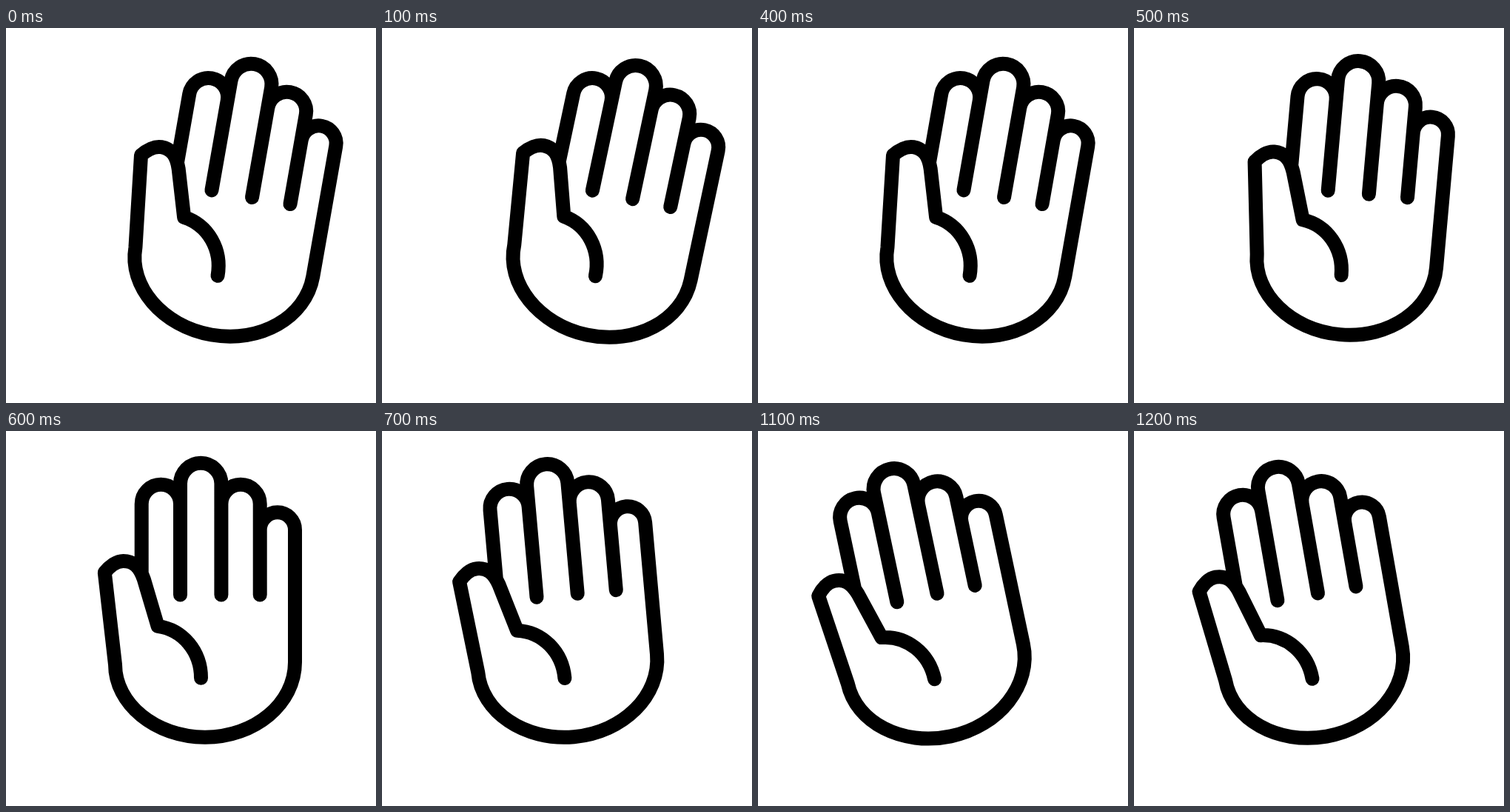
Write an HTML page with a canvas that moves like this. It is 500x506 px and loops after 1.3 s.

```html
<!DOCTYPE html>
<html lang="en">
<head>
<meta charset="utf-8">
<title>Waving hand</title>
<style>
  html, body { margin: 0; width: 100%; height: 100%; overflow: hidden; background: #fff; }
  canvas { display: block; }
</style>
</head>
<body>
<canvas id="stage" width="500" height="506"></canvas>
<script>
const ctx = document.getElementById('stage').getContext('2d');
const STEP = 100;
const COUNT = 13;
const PIVOT = { x: 263.5, y: 403, sway: 10.4 };

// Right half of the wave, in degrees; the left half mirrors it.
const TILT = [10, 12, 13, 12, 10, 5.1, 0];

// Hand coordinates: origin at the wrist pivot, y down.
const hand = new Path2D();

function finger(left, right, top, leftEnd, rightEnd) {
  hand.moveTo(left, leftEnd);
  hand.lineTo(left, top);
  hand.arc((left + right) / 2, top, (right - left) / 2, Math.PI, 0);
  hand.lineTo(right, rightEnd);
}

finger(-80.3, -28, -304.6, -213, -300);
finger(-28, 27.4, -332, -182, -182);
finger(27.4, 79.7, -304.5, -300, -182);
finger(79.7, 127, -269.5, -265, -91);

// Palm, thumb and the crease below it
hand.moveTo(127, -91);
hand.bezierCurveTo(127, -35, 72.6, 10.2, 5.5, 10.2);
hand.bezierCurveTo(-62, 10.2, -116, -35, -116, -88);
hand.lineTo(-130.2, -212);
hand.bezierCurveTo(-123.5, -220.5, -114, -227.5, -105, -227.5);
hand.bezierCurveTo(-91, -227.5, -83, -220, -77.2, -203);
hand.lineTo(-58.4, -139.6);
hand.bezierCurveTo(-24.5, -135, 0, -105.5, 0, -69.7);

function tiltAt(i) {
  return i <= 6 ? TILT[i] : -TILT[COUNT - 1 - i];
}

function draw(ms) {
  const tilt = tiltAt(Math.floor(ms / STEP) % COUNT);
  ctx.fillStyle = '#fff';
  ctx.fillRect(0, 0, 500, 506);
  ctx.save();
  ctx.translate(PIVOT.x + Math.sign(tilt) * PIVOT.sway, PIVOT.y);
  ctx.rotate(tilt * Math.PI / 180);
  ctx.strokeStyle = '#000';
  ctx.lineWidth = 19;
  ctx.lineCap = 'round';
  ctx.lineJoin = 'round';
  ctx.stroke(hand);
  ctx.restore();
}

const start = performance.now();
function loop() {
  draw(performance.now() - start);
  requestAnimationFrame(loop);
}
loop();
</script>
</body>
</html>
```
